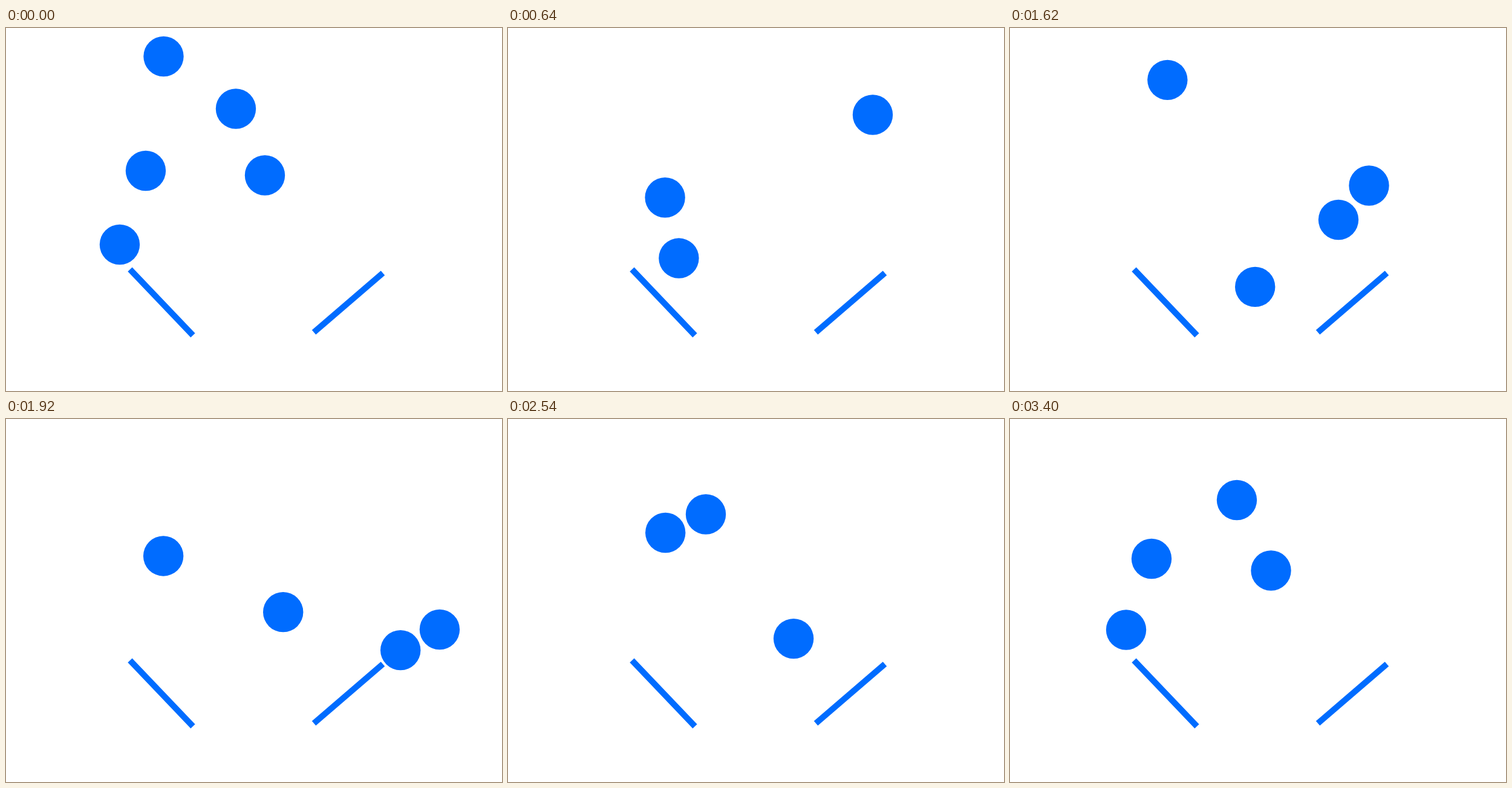
An HTML page with a canvas for the animation above (3.45 s loop, 820 by 600 pixels).

```html
<!DOCTYPE html>
<html lang="en">
<head>
<meta charset="utf-8">
<title>Bouncing balls</title>
<style>
  html, body { margin: 0; height: 100%; overflow: hidden; background: #fff; }
  canvas { display: block; }
</style>
</head>
<body>
<canvas id="stage" width="820" height="600"></canvas>
<script>
const canvas = document.getElementById('stage');
const ctx = canvas.getContext('2d');
const LOOP = 3450, STEP = 30, HOLD = 50;
const HALF_G = 5.7e-4; // px / ms²
const RADIUS = 33.2, COLOR = '#006cff';
const RAMPS = new Path2D('M205 399L309 508M509 503L623 405');

// Each run of even steps ends with a slightly longer pause.
const RUNS = [0, 50, 640, 1200, 1770, 2330, 2830, LOOP];

// Contact points [time, x, y]; between them a ball is in free flight.
// Times past the loop length carry on into the next round.
const drop = t => [t, 260.5, 47];
const ramps = t => [[t, 260, 401], [t + 265, 499, 461]];

const BALLS = [
  [drop(0), [733, 259.5, 353], [845, 262, 404], [1060, 384.5, 358],
   [1620, 593.5, 260.5], [2190, 828, 514.5]],

  [drop(678), [1060, 260.5, 130], ...ramps(1459), [2190, 402, 195.5],
   [2860, 258.5, 245], [3070, 218, 355], [3265, 222, 265], [3400, 192, 348.5],
   [LOOP, 188, 358], [3900, -36, 490]],

  [drop(1362), ...ramps(2147), [2860, 405, 200], [3210, 326, 142],
   [3400, 375, 134], [LOOP, 380, 133.5], [3545, 403, 124], [4090, 603, 143.5],
   [4510, 757, 391]],

  [drop(2058), [2190, 260.5, 57.5], ...ramps(2829), [3400, 431.5, 250.5],
   [LOOP, 428, 243.5], [3545, 396, 190], [4140, 272, 415], [4350, 350, 470],
   [4450, 344, 484], [4510, 365.5, 453.5], [5070, 543, 317], [5640, 750.5, 528.5]],

  [drop(2742), [3210, 260, 172], [3400, 234, 231], [LOOP, 231, 236],
   [3760, 180, 370], [4070, -36, 364]]
];

function snap(t) {
  const i = RUNS.findIndex((r, n) => t < RUNS[n + 1]);
  const start = RUNS[i];
  const last = Math.floor((RUNS[i + 1] - start - HOLD) / STEP);
  return start + STEP * Math.min(last, Math.floor((t - start) / STEP));
}

// After its last point a ball keeps flying along the same curve.
function position(path, t) {
  let i = path.findIndex(p => p[0] > t);
  if (i < 0) i = path.length - 1;
  if (!i) return null;
  const [t0, x0, y0] = path[i - 1], [t1, x1, y1] = path[i];
  const p = (t - t0) / (t1 - t0);
  return [x0 + (x1 - x0) * p,
          y0 + (y1 - y0) * p - HALF_G * (t - t0) * (t1 - t)];
}

function drawBall(path, t) {
  const pos = position(path, t);
  if (!pos) return;
  ctx.beginPath();
  ctx.arc(...pos, RADIUS, 0, 2 * Math.PI);
  ctx.fill();
}

function draw(now) {
  const t = snap(now % LOOP);
  ctx.clearRect(0, 0, canvas.width, canvas.height);
  ctx.fillStyle = ctx.strokeStyle = COLOR;
  ctx.lineWidth = 10;
  ctx.stroke(RAMPS);
  for (const path of BALLS) {
    drawBall(path, t);
    drawBall(path, t + LOOP);
  }
}

const begin = performance.now();
function tick() {
  draw(performance.now() - begin);
  requestAnimationFrame(tick);
}
tick();
</script>
</body>
</html>
```
